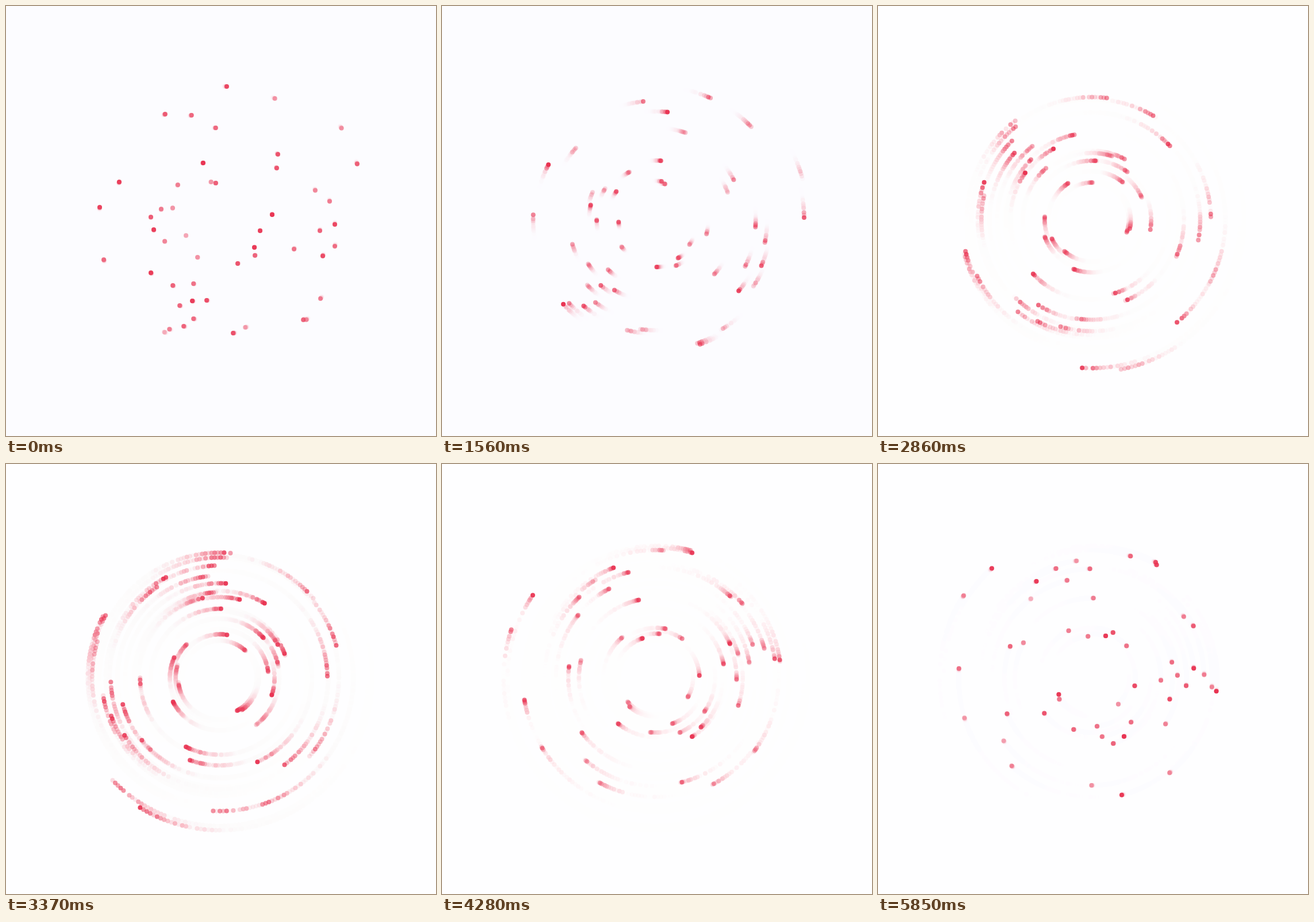
Recreate the animation shown at these times as an HTML page with a canvas. Size 748 px wide and 748 px high, loop 5.89 s.

```html
<!DOCTYPE html>
<html lang="en">
<head>
<meta charset="utf-8">
<title>Spinning dots</title>
<style>
  html, body { margin: 0; width: 100%; height: 100%; overflow: hidden; background: #fcfcfe; }
  canvas { display: block; width: 748px; height: 748px; }
</style>
</head>
<body>
<canvas id="stage" width="748" height="748"></canvas>
<script>
const LOOP = 5890, HOLD = 100, FRAME = 34.02, SIZE = 748, CENTER = 372, RADIUS = 4;
const DRIFT = 7.7; // degrees per second while idle
const WARMUP = -30;

// time in s, extra spin in degrees per second, trail fade per draw
const steps = [
  [0, 0, .35], [1.19, 0, .35], [1.56, 51.5, .29], [2.31, 70, .19],
  [3.37, 77.6, .08], [4.1, 85.3, .11], [4.39, 0, .29], [4.8, 0, .35], [5.9, 0, .35]
];

// starting places, x and y in turn
const places = [
  384,140, 468,161, 277,188, 323,190, 365,212, 584,213, 473,258, 471,282, 343,273, 611,275,
  197,306, 299,311, 357,306, 365,308, 163,350, 270,353, 290,351, 252,367, 538,321, 563,340,
  463,363, 442,391, 572,380, 546,391, 572,418, 551,435, 501,423, 432,420, 433,434, 403,448,
  257,389, 276,409, 313,399, 333,437, 170,441, 252,464, 290,486, 326,483, 302,521, 324,513,
  349,512, 326,544, 309,557, 284,562, 275,567, 395,569, 416,559, 547,509, 517,546, 522,546
];

const dots = [];
for (let i = 0; i < places.length; i += 2) {
  const x = places[i] - CENTER, y = places[i + 1] - CENTER;
  dots.push({ r: Math.hypot(x, y), a: Math.atan2(y, x) });
}

const ctx = document.getElementById('stage').getContext('2d');

// spin angle in radians and trail fade at a time in seconds
function motion(t) {
  let turn = DRIFT * (t - (HOLD - FRAME) / 1000), fade = steps[0][2];
  for (let i = 1; i < steps.length; i++) {
    const [t0, v0, f0] = steps[i - 1], [t1, v1, f1] = steps[i];
    if (t <= t0) break;
    const p = Math.min(1, (t - t0) / (t1 - t0));
    turn += (v0 + (v1 - v0) * p / 2) * p * (t1 - t0);
    fade = f0 + (f1 - f0) * p;
  }
  return { turn: turn * Math.PI / 180, fade };
}

// repeatable noise from 0 to 1
function noise(i, n) {
  let h = Math.imul(i + 1, 374761393) ^ Math.imul(n + 101, 668265263);
  h = Math.imul(h ^ (h >>> 13), 1274126177);
  h = Math.imul(h ^ (h >>> 16), 2246822519);
  return ((h ^ (h >>> 15)) >>> 0) / 4294967296;
}

function clear(alpha) {
  ctx.globalAlpha = alpha;
  ctx.fillStyle = '#fcfcfe';
  ctx.fillRect(0, 0, SIZE, SIZE);
}

function paint(n) {
  const { turn, fade } = motion((HOLD - FRAME + n * FRAME / 2) / 1000);
  clear(fade);
  ctx.fillStyle = '#e83150';
  dots.forEach((d, i) => {
    const a = d.a + turn;
    ctx.globalAlpha = noise(i, n);
    ctx.beginPath();
    ctx.arc(CENTER + d.r * Math.cos(a), CENTER + d.r * Math.sin(a), RADIUS, 0, 2 * Math.PI);
    ctx.fill();
  });
}

let drawn = Infinity;

// replays the fixed series of draws up to the given time
function show(t) {
  const goal = t < HOLD ? 0 : 2 * (Math.floor((t - HOLD + 5) / FRAME) + 1);
  if (goal < drawn) {
    clear(1);
    drawn = WARMUP;
  }
  while (drawn < goal) paint(++drawn);
}

const start = performance.now();
function tick() {
  show((performance.now() - start) % LOOP);
  requestAnimationFrame(tick);
}
tick();
</script>
</body>
</html>
```
